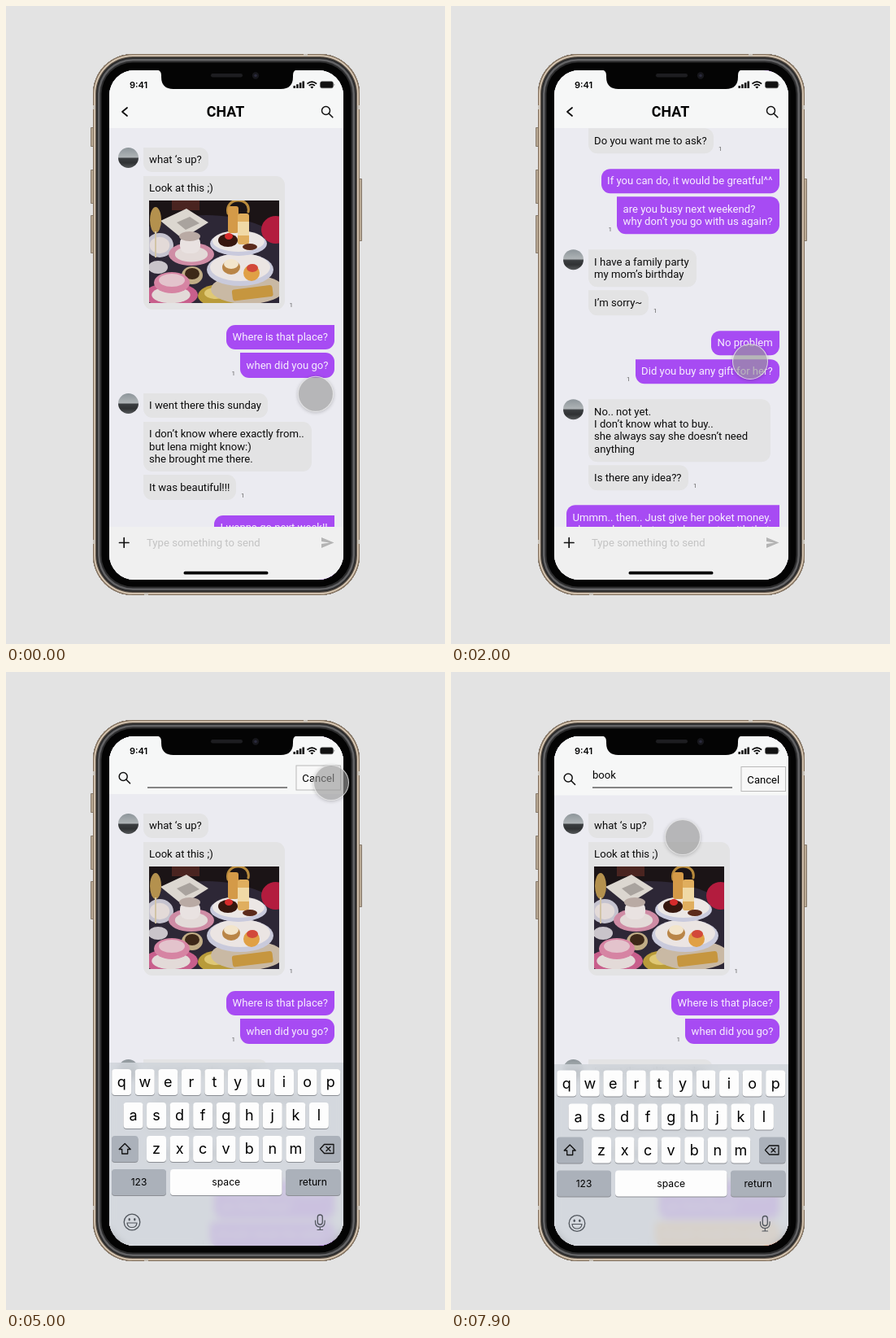
An HTML page that plays this animation: 540 by 784 pixels, repeating every 8000 ms.

```html
<!DOCTYPE html>
<html lang="en">
<head>
<meta charset="utf-8">
<title>Chat search</title>
<style>
html, body { margin: 0; width: 100%; height: 100%; overflow: hidden; background: #e3e3e3; }
#stage { position: relative; width: 540px; height: 784px; overflow: hidden; font: 13.12px/15.4px Roboto, Arial, sans-serif; color: #0b0b0b; }
.full { position: absolute; left: 0; top: 0; width: 540px; height: 784px; }
#body { position: absolute; left: 107px; top: 59px; width: 328px; height: 665px; border-radius: 49px; background: #040404;
  box-shadow: inset 0 0 0 1.2px #84725f, inset 0 0 0 3px #d8c8b4, inset 0 0 0 4.2px #5d5349, inset 0 0 0 6px #2b2b2c,
    inset 0 0 0 8.5px #636365, inset 0 0 0 10.5px #2c2c2d; }
#screen { position: absolute; left: 127px; top: 79px; width: 288px; height: 626px; border-radius: 31px; overflow: hidden; background: #ebebf1; }
.page { position: absolute; left: -127px; top: -79px; width: 540px; height: 784px; background: #ebebf1; }
.list { position: absolute; left: 168.5px; top: 173.8px; width: 235.5px; }
.group { position: relative; display: flex; flex-direction: column; align-items: flex-start; margin-bottom: 18.8px; }
.bubble { position: relative; box-sizing: border-box; padding: 7.6px; margin-bottom: 4.2px; white-space: nowrap;
  background: #e3e3e4; border-radius: 0 11px 11px 11px; }
.bubble:last-of-type { margin-bottom: 0; }
.mine { align-items: flex-end; }
.mine .bubble { background: #a74bf3; color: #f7effe; }
.mine .bubble:first-of-type { border-radius: 11px 0 11px 11px; }
.found .hit { background: #ffb35a !important; }
.bubble i { position: absolute; bottom: 0; right: -10.5px; font: 8px/10px Roboto, sans-serif; color: #666; }
.mine i { right: auto; left: -10.5px; }
.avatar { position: absolute; left: -31px; top: 0; width: 25px; height: 25px; border-radius: 50%;
  background: linear-gradient(#8d959a, #aeb3b6 46%, #3a3d40 54%, #303234 75%, #55585a); }
.photo { display: block; margin-top: 7.6px; }
.keys { position: absolute; left: 127px; width: 288px; top: 480px; height: 240px; background: rgba(209, 213, 219, .86); backdrop-filter: blur(5px); }
#cursor { position: absolute; left: -22px; top: -22px; width: 44px; height: 44px; border-radius: 50%; box-sizing: border-box;
  background: rgba(152, 152, 152, .64); border: 1.3px solid rgba(240, 240, 240, .75); box-shadow: 0 1px 4px rgba(0, 0, 0, .22); }
</style>
</head>
<body>
<div id="stage">
  <svg class="full" fill="#b9a994" stroke="#75675a" stroke-width=".8">
    <path d="M104.500 149.500h4v23h-4zM104.500 201.500h4v41h-4zM104.500 257.500h4v46h-4zM433.500 212.500h4v76h-4z"/>
  </svg>
  <div id="body"></div>
  <svg class="full" fill="#c9c2b8"><path d="M107 122h3v5h-3zM432 122h3v5h-3zM107 656h3v5h-3zM432 656h3v5h-3zM366 59h5v3h-5zM170 721h5v3h-5z"/></svg>
  <div id="screen"></div>
  <svg class="full">
    <path d="M183 78h177q-7 0-7 7v2q0 15-15 15H206q-15 0-15-15v-2q0-7-8-7z" fill="#040404"/>
    <rect x="252" y="83" width="39" height="4.5" rx="2.2" fill="#1d1d20"/>
    <circle cx="307" cy="85.5" r="4.2" fill="#17171c"/><circle cx="307" cy="85.5" r="1.8" fill="#2a2a3c"/>
    <text x="152" y="101" font-family="Inter, sans-serif" font-size="11" font-weight="600">9:41</text>
    <path d="M353.5 98h2.500v3h-2.500zM357.200 96.300h2.500v4.700h-2.500zM360.900 94.300h2.500v6.700h-2.500zM364.500 92.500h2.500v8.500h-2.500z"/>
    <path d="M370.500 95.600q5.800-5 11.600 0M372.700 97.900q3.600-3 7.200 0" fill="none" stroke="#000" stroke-width="1.7"/>
    <path d="M374.300 99.500q2-1.600 4 0l-2 2z"/>
    <rect x="386.5" y="92.8" width="16" height="8" rx="2.2" fill="#111" stroke="#555" stroke-width=".6"/>
    <path d="M403.500 95.200q1.600 1.500 0 3z" fill="#555"/>
  </svg>
  <div id="cursor"></div>
</div>
<script>
const $ = id => document.getElementById(id);
const oval = (x, y, rx, ry, fill) => `<ellipse cx="${x}" cy="${y}" rx="${rx}" ry="${ry}" fill="${fill}"/>`;
const rect = (x, y, w, h, fill, more = '') => `<rect x="${x}" y="${y}" width="${w}" height="${h}" fill="${fill}" ${more}/>`;
const text = (x, y, str, more = '') => `<text x="${x}" y="${y}" ${more}>${str}</text>`;
const svg = body => `<svg class="full">${body}</svg>`;
const lines = (d, width = 1.4, color = '#111') =>
  `<path d="${d}" fill="none" stroke="${color}" stroke-width="${width}" stroke-linecap="round" stroke-linejoin="round"/>`;

// Tea table in flat shapes
const plate = (x, y, rx, ry, rim) => oval(x, y, rx, ry, rim) + oval(x, y, rx * .72, ry * .68, '#e3dad8');
const photo = '<svg class="photo" width="159.5" height="126">' +
  rect(0, 0, 160, 126, '#1b1416') + oval(70, 100, 125, 82, '#2d2736') +
  oval(156, 36, 18, 17, '#b31c3e') + rect(28, 0, 34, 12, '#4a2420') +
  '<path d="M14 25L46 10L73 27L41 47Z" fill="#dcd7d0"/><path d="M34 27l16-7 12 8-17 8z" fill="#a9a39e"/>' +
  plate(13, 55, 17, 15, '#c5c3cf') + oval(8, 24, 7, 16, '#b4914e') + rect(7, 38, 2, 32, '#d2c4a6') + oval(11, 82, 12, 8, '#c9c4ca') +
  plate(52, 66, 28, 14, '#cf8ca5') + rect(38, 43, 25, 22, '#e9e2e1', 'rx="9"') + oval(50, 44, 13, 6, '#b9aaa4') +
  oval(53, 92, 13, 11, '#c1ad86') + oval(53, 90, 9, 7, '#3d2818') +
  plate(27, 116, 33, 15, '#c85f8c') + oval(28, 101, 22, 13, '#d684a3') + oval(28, 98, 16, 8, '#e3c3cc') +
  oval(88, 117, 28, 14, '#b99b3a') + oval(82, 114, 14, 7, '#dfc875') +
  oval(121, 109, 45, 18, '#c9b9a4') + rect(102, 107, 50, 14, '#c6963f', 'rx="3" transform="rotate(-7 125 112)"') +
  oval(112, 85, 41, 20, '#c9cadb') + oval(112, 82, 37, 17, '#ebe5e3') +
  oval(110, 53, 35, 15, '#c9cadd') + oval(110, 50, 32, 13, '#ece7e5') +
  lines('M97 16C92-5 126-5 122 14', 3, '#b88a3c') +
  rect(97, 7, 13, 33, '#d49a48', 'rx="3"') + rect(109, 16, 14, 38, '#e0ae5e', 'rx="3"') + rect(109, 26, 14, 17, '#f0d9a6') +
  oval(97, 49, 12, 8, '#36170f') + oval(98, 44, 5, 4, '#d62b2b') + oval(124, 57, 9, 4, '#5b2a1b') +
  oval(101, 82, 11, 9, '#b98547') + oval(101, 78, 9, 6, '#f3e5cb') +
  oval(126, 89, 10, 10, '#e0a045') + oval(127, 83, 7, 5, '#d2483a') + '</svg>';

// Groups alternate between friend and self; each bubble is [width, text, class]
const chat = [
  [[80, 'what ‘s up?'], [174, 'Look at this ;)' + photo]],
  [[133, 'Where is that place?'], [116, 'when did you go?']],
  [[153.5, 'I went there this sunday'], [207, 'I don’t know where exactly from..<br>but lena might know:)<br>she brought me there.'], [114.5, 'It was beautiful!!!']],
  [[148, 'I wanna go next week!!<br>are there busy?'], [153.5, 'should i book the table?', 'hit']],
  [[189.5, 'I’m not sure..<br>but probably booking is better'], [154.5, 'Do you want me to ask?']],
  [[219.5, 'If you can do, it would be greatful^^'], [200, 'are you busy next weekend?<br>why don’t you go with us again?']],
  [[133, 'I have a family party<br>my mom’s birthday'], [74.5, 'I’m sorry~']],
  [[84, 'No problem'], [177.5, 'Did you buy any gift for her?']],
  [[224.5, 'No.. not yet.<br>I don’t know what to buy..<br>she always say she doesn’t need<br>anything'], [123.5, 'Is there any idea??']],
  [[262, 'Ummm.. then.. Just give her poket money.<br>she can buy whatever she wants with that.'], [189.5, 'Or bring her afternoon tea?? ;)']],
  [[224.5, 'that’s good idea.<br>I should book for her birthday!'], [214, 'Thank you for giving me the good<br>idea!']]
];
const list = '<div class="list">' + chat.map((group, g) =>
  `<div class="group ${g % 2 ? 'mine' : ''}">` + group.map(([w, str, cls = ''], i) =>
    `<div class="bubble ${cls}" style="width:${w}px">${str}${i == group.length - 1 ? '<i>1</i>' : ''}</div>`).join('') +
  (g % 2 ? '' : '<span class="avatar"></span>') + '</div>').join('') + '</div>';

const lens = x => `<circle cx="${x - 1.5}" cy="128.5" r="5" fill="none" stroke="#111" stroke-width="1.5"/>` +
  lines(`M${x + 2.2} 132.200l4.600 4.600`, 1.6);

const chatPage = list + svg(
  rect(127, 79, 288, 71, '#f6f7f7') + rect(127, 640, 288, 66, '#f0f0f0') +
  lines('M149 125l-6 5 6 5', 1.8) + lens(395) +
  text(270, 136.3, 'CHAT', 'font-size="17.8" font-weight="700" text-anchor="middle"') +
  lines('M139.500 659.500h11.500M145.200 653.700v11.500', 1.7) +
  text(173, 664, 'Type something to send', 'fill="#c3c3c3"') +
  '<path d="M388 653l15.500 6.500-15.500 6.500v-5l10-1.500-10-1.500z" fill="#b4b4b4"/>' +
  rect(218.5, 694.8, 104, 3.8, '#000', 'rx="1.9"'));

const key = (x, y, w, label, size = 18, fill = '#fdfdfd') =>
  rect(x, y + 1, w, 32, '#8b8e94', 'rx="4"') + rect(x, y, w, 32, fill, 'rx="4"') +
  text(x + w / 2, y + 16 + size * .35, label, `font-size="${size}" text-anchor="middle" font-family="Inter, sans-serif"`);
const row = (str, x, y) => [...str].map((c, i) => key(x + i * 28.55, y, 24, c)).join('');
const gray = '#abb1ba', ink = '#50555c';
const keyboard = row('qwertyuiop', 130.2, 488) + row('asdfghjkl', 144.5, 529) + row('zxcvbnm', 173, 570) +
  key(130, 570, 32.5, '', 12, gray) + key(379, 570, 32.5, '', 12, gray) +
  key(130, 611, 67, '123', 12, gray) + key(202, 611, 137.5, 'space', 12.2) + key(344, 611, 67.5, 'return', 12.2, gray) +
  lines('M146.200 579.500l7 7h-3.500v5.500h-7v-5.500h-3.500z', 1.3) +
  lines('M386.500 586l5-5.500h11.500v11h-11.500zM394 583.500l5 5M399 583.500l-5 5', 1.3) +
  `<circle cx="155" cy="676" r="9.8" fill="none" stroke="${ink}" stroke-width="1.3"/>` +
  oval(151.7, 672.7, 1.2, 1.7, ink) + oval(158.3, 672.7, 1.2, 1.7, ink) +
  lines('M149 677h12q-.5 5.500-6 5.500t-6-5.500z', 1.2, ink) +
  `<rect x="383.3" y="667" width="6" height="12" rx="3" fill="none" stroke="${ink}" stroke-width="1.3"/>` +
  lines('M380.500 674v2q0 6 5.800 6t5.800-6v-2M386.300 682v3.500M383 685.500h6.600', 1.2, ink);

const searchPage = (word, dy) => list +
  `<div class="keys" style="margin-top:${dy}px"></div>` +
  svg(rect(127, 79, 288, 71 + dy, '#f6f7f7') + `<g transform="translate(0 ${dy})">` +
    lens(145.7) + rect(357, 115, 54.5, 30, '#f8f8f8', 'stroke="#b9b9b9"') +
    text(384.3, 135.4, 'Cancel', 'text-anchor="middle"') + keyboard + '</g>' +
    rect(174, 141.4, 172, 1.2, '#3a3a3a') + text(174, 131.3, word));

$('screen').innerHTML = `<div class="page" id="chat">${chatPage}</div>` +
  `<div class="page" id="search">${searchPage('', 0)}</div>` +
  `<div class="page found" id="result">${searchPage('book', 1.5)}</div>`;
const feed = document.querySelector('#chat .list'), cursor = $('cursor');

const ramp = (t, a, b) => Math.min(1, Math.max(0, (t - a) / (b - a)));
const out = (p, n = 2) => 1 - (1 - p) ** n;
const soft = p => p * p * (3 - 2 * p);
const rush = p => p ** 1.5;

// Pointer stops: time, x, y, easing on the way there
const path = [
  [0, 381, 477], [350, 368, 437, out], [3550, 368, 437, soft], [3900, 361, 230, rush], [4350, 400, 136, out],
  [6150, 400, 136, soft], [6550, 300, 122, rush], [7000, 220, 131, out], [7450, 220, 131, soft], [7900, 285, 203, soft]
];
function pointer(t) {
  const i = path.findIndex(k => k[0] > t);
  if (i < 0) return path[path.length - 1].slice(1);
  const [a, x, y] = path[i - 1], [b, x2, y2, ease] = path[i], p = ease(ramp(t, a, b));
  return [x + (x2 - x) * p, y + (y2 - y) * p];
}

const start = performance.now();
function draw(now) {
  const t = Math.max(0, now - start) % 8000;
  const scroll = 409 * out(ramp(t, 250, 1550), 3) + 385 * out(ramp(t, 1731, 3511), 5);
  feed.style.transform = `translateY(${-scroll}px)`;
  $('search').style.opacity = soft(ramp(t, 4480, 4850));
  $('result').style.opacity = soft(ramp(t, 7350, 7620));
  const [x, y] = pointer(t), pressed = t > 7050 && t < 7400;
  cursor.style.transform = `translate(${x}px, ${y}px)`;
  cursor.style.backgroundColor = `rgba(152, 152, 152, ${pressed ? .76 : .64})`;
  cursor.style.borderColor = pressed ? 'transparent' : '';
  requestAnimationFrame(draw);
}
draw(start);
</script>
</body>
</html>
```
